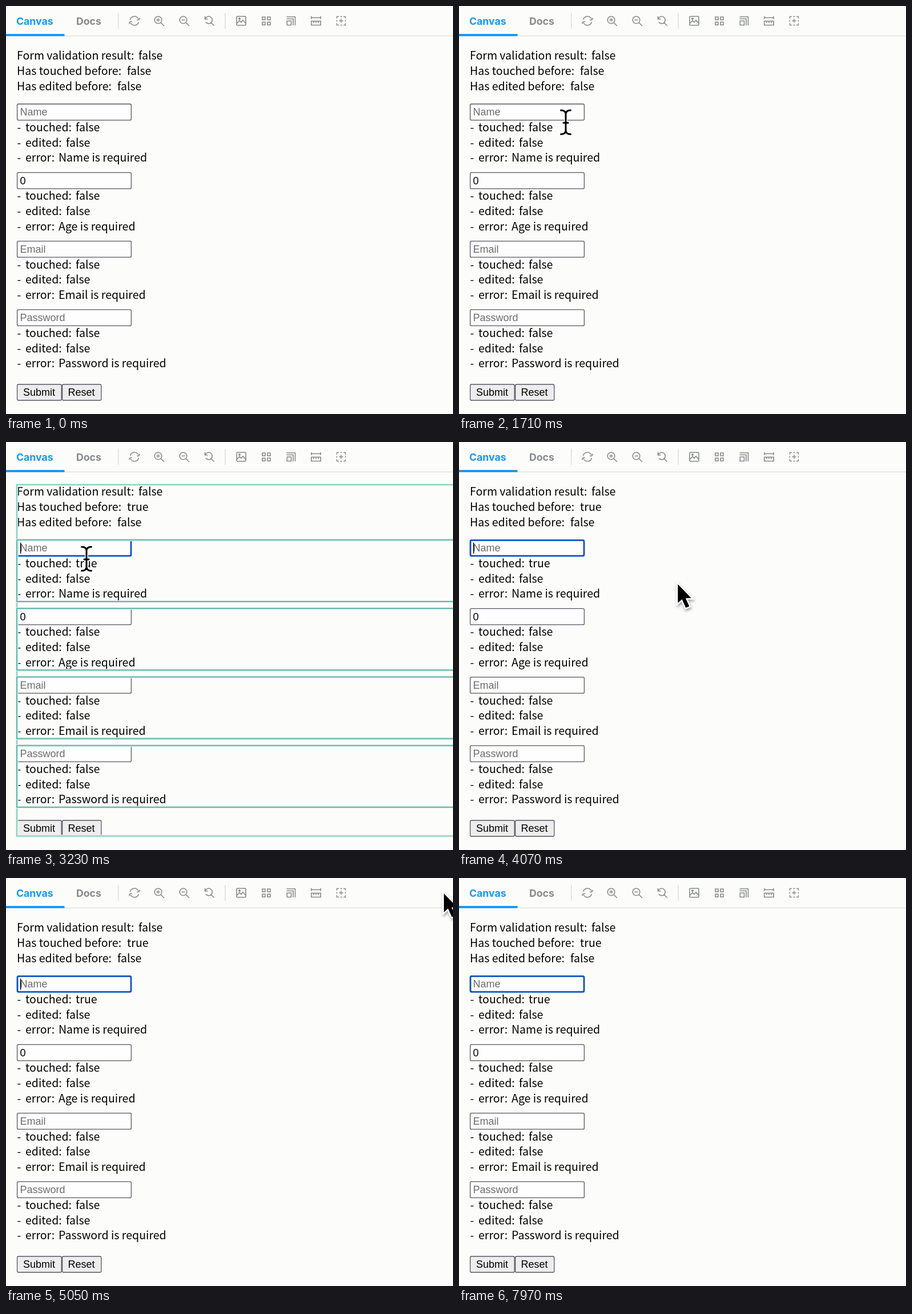
Recreate the animation shown at these times as an HTML page. Size 783 by 716 pixels, loop 7.99 s.

```html
<!DOCTYPE html>
<html lang="en">
<head>
<meta charset="utf-8">
<title>Form validation</title>
<style>
  html, body { margin: 0; width: 100%; height: 100%; overflow: hidden; background: #fcfdfb; }
  svg { display: block; width: 783px; height: 716px; }
  .body { font: 19.55px "Noto Sans CJK KR", "Noto Sans CJK JP", "Noto Sans", sans-serif; fill: #000; }
  .control { font: 18px "Liberation Sans", Arial, sans-serif; fill: #000; }
  .hint { fill: #6c6c6c; }
  .tab { font: 700 17.7px Inter, sans-serif; fill: #868a8c; }
  .box { fill: #fefefe; stroke: #565660; stroke-width: 1.3; }
  .button { fill: #ededee; }
  .icons { fill: none; stroke: #87898b; stroke-width: 1.6; }
</style>
</head>
<body>
<svg viewBox="0 0 783 716">
  <rect width="783" height="716" fill="#fcfdfb"/>
  <path d="M0 52.5H783" stroke="#d5d8da" stroke-width="1.2"/>
  <rect y="49" width="102.5" height="4" fill="#1998f2"/>
  <text class="tab" x="18" y="33" style="fill:#1998f2">Canvas</text>
  <text class="tab" x="123" y="33">Docs</text>
  <path d="M196.7 12V40M384 12V40" stroke="#d8dadb" stroke-width="1.3"/>
  <g class="icons">
    <path d="M217.5 24A7.8 7.8 0 0 1 232 22.5M232.5 28A7.8 7.8 0 0 1 218 29.5M229 24.5L232.5 24.5L234.5 21M221 27.5L217.5 27.5L215.5 31"/>
    <circle cx="266.5" cy="24.5" r="6.3"/>
    <path d="M271 29L277 35M263.5 24.5H269.5M266.5 21.5V27.5"/>
    <circle cx="310.5" cy="24.5" r="6.3"/>
    <path d="M315 29L321 35M307.5 24.5H313.5"/>
    <path d="M348.5 18V23H353.5M349 22.5A6.3 6.3 0 1 1 350 28.5M359 29L364.5 34.5"/>
    <rect x="404" y="18.2" width="16" height="15.6" rx="1"/>
    <path d="M404.5 30.5L409 25.5L412 28.5L415 25L420 30.5"/>
    <circle cx="409" cy="22.3" r="1.2"/>
    <path d="M449 19.2h5v5h-5zM458 19.2h5v5h-5zM449 28.2h5v5h-5zM458 28.2h5v5h-5z"/>
    <path d="M491.5 19H506.5V34M491.5 22.5H503V34M492.3 26.3H499.5V33.5H492.3Z"/>
    <path d="M535 18V23M551 18V23M535 20.5H551M534.8 26.5H551.2V33.5H534.8ZM539 27V30M543 27V30M547 27V30"/>
    <path d="M579.5 22V18.5H583M591 18.5H594.5V22M594.5 30V33.5H591M583 33.5H579.5V30M585.5 18.5H588.5M585.5 33.5H588.5M579.5 24.5V27.5M594.5 24.5V27.5M583.5 26H590.5M587 22.5V29.5" stroke-width="1.4"/>
  </g>
  <g id="form"></g>
  <rect id="focus" x="20" y="172.4" width="199" height="27.4" rx="2.5" fill="none" stroke="#0b53c0" stroke-width="2.8"/>
  <path id="caret" d="M25.6 176.5V196" stroke="#000" stroke-width="1.5"/>
  <g id="flash" fill="none"></g>
  <g id="arrow" style="filter:drop-shadow(1px 3px 2px rgba(0,0,0,.35))">
    <path d="M0 0V33L7.3 26.3L14 41.3L20 38.6L13.5 24.3H23.5Z" stroke="#fff" stroke-width="5" paint-order="stroke" stroke-linejoin="miter"/>
  </g>
  <g id="beam" fill="none" stroke-linecap="round">
    <path id="stem" d="M-8.5 -21Q0 -21 0 -14Q0 -21 8.5 -21M0 -14V14M-8.5 21Q0 21 0 14Q0 21 8.5 21M-4 1H4" stroke="#fff" stroke-width="5.4"/>
    <use href="#stem"/>
    <path d="M-8.5 -21Q0 -21 0 -14Q0 -21 8.5 -21M0 -14V14M-8.5 21Q0 21 0 14Q0 21 8.5 21M-4 1H4" stroke="#000" stroke-width="3"/>
  </g>
</svg>
<script>
const LOOP = 7990, CLICK = 3070, FLASH_END = 3310, BLINK = 420;
const LINE = 26.7, FIELD_STEP = 120.3;
const $ = id => document.getElementById(id);

function add(parent, tag, attrs, text = "") {
  const node = document.createElementNS("http://www.w3.org/2000/svg", tag);
  for (const key in attrs) node.setAttribute(key, attrs[key]);
  node.textContent = text;
  return parent.appendChild(node);
}

const form = $("form"), flash = $("flash");
const write = (x, y, text, cls = "body") => add(form, "text", { x, y, class: cls }, text);
const box = (x, y, width, height, cls = "box") =>
  add(form, "rect", { x, y, width, height, rx: 2.2, class: cls });

const summary = [["Form validation result:", 232], ["Has touched before:", 212], ["Has edited before:", 195]]
  .map(([label, x], i) => {
    write(19, 94.3 + i * LINE, label);
    return write(x, 94.3 + i * LINE, "false");
  });

const touched = ["Name", "Age", "Email", "Password"].map((name, i) => {
  const top = 172 + i * FIELD_STEP;
  const isAge = name === "Age";
  box(19.6, top, 199.8, 28.3);
  write(24.5, top + 20.3, isAge ? "0" : name, isAge ? "control" : "control hint");
  const values = [["touched:", "false", 122], ["edited:", "false", 105], ["error:", name + " is required", 92]];
  return values.map(([label, value, x], row) => {
    const y = top + 48 + row * LINE;
    write(19.5, y, "-");
    write(34, y, label);
    return write(x, y, value);
  })[0];
});

[["Submit", 19.6, 77.6, 30], ["Reset", 98.6, 68.2, 108.5]].forEach(([label, x, width, textX]) => {
  box(x, 664, width, 28, "box button");
  write(textX, 684, label, "control");
});

// Re-render highlights run past the right edge of the stage.
function highlight(y, height, color) {
  add(flash, "rect", { x: 19, y, width: 800, height, stroke: "#e3f1ed", "stroke-width": 4.6 });
  add(flash, "rect", { x: 19, y, width: 800, height, stroke: color, "stroke-width": 2 });
}
highlight(75, 616.5, "#8fcfc2");
for (let i = 0; i < 4; i++) highlight(171.8 + i * FIELD_STEP, 108.2, "#5fb6a8");

// Pointer path: time, x, y.
const path = [
  [430, 800, 340], [970, 218, 223], [1130, 216, 221], [1500, 187, 204], [2090, 187, 204],
  [2800, 141, 205], [3770, 141, 205], [4250, 494, 270], [4480, 477, 266],
  [4650, 477, 266], [5150, 800, 0]
];

function pointerAt(t) {
  const next = path.findIndex(point => point[0] > t);
  if (next < 1) return null;
  const [t0, x0, y0] = path[next - 1], [t1, x1, y1] = path[next];
  const k = (t - t0) / (t1 - t0), ease = k * k * (3 - 2 * k);
  return [x0 + (x1 - x0) * ease, y0 + (y1 - y0) * ease];
}

const show = (node, on) => node.setAttribute("visibility", on ? "visible" : "hidden");

function render(t) {
  const focused = t >= CLICK;
  summary[1].textContent = touched[0].textContent = String(focused);
  show($("focus"), focused);
  show($("caret"), focused && Math.floor((t - CLICK) / BLINK) % 2 === 0);
  show(flash, focused && t < FLASH_END);

  const pos = pointerAt(t);
  const overText = pos && pos[0] < (focused ? 163 : 210);
  show($("arrow"), pos && !overText);
  show($("beam"), overText);
  if (pos) $(overText ? "beam" : "arrow").setAttribute("transform", `translate(${pos[0]} ${pos[1]})`);
}

const start = performance.now();
function tick() {
  render((performance.now() - start) % LOOP);
  requestAnimationFrame(tick);
}
tick();
</script>
</body>
</html>
```
